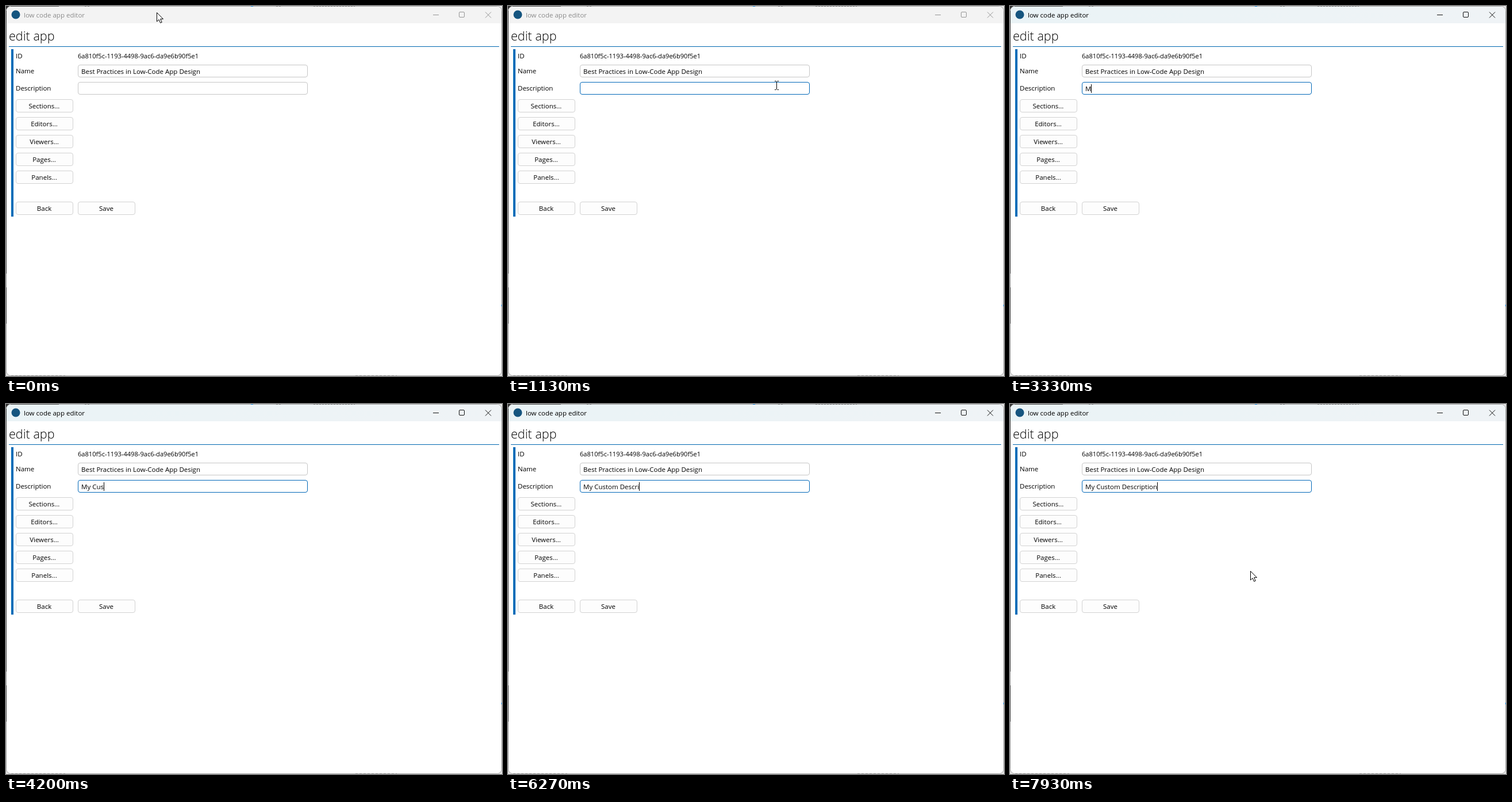
An HTML page for the animation above (8000 ms loop, 863x643 px).

```html
<!DOCTYPE html>
<html lang="en">
<head>
<meta charset="utf-8">
<title>edit app</title>
<style>
html, body { margin: 0; width: 100%; height: 100%; overflow: hidden; background: #e6e6e6; }
svg { display: block; }
text { font: 11.5px "Open Sans", "Noto Sans", sans-serif; white-space: pre; }
.mid { text-anchor: middle; }
.box { fill: #fff; stroke: #c6c6c6; }
.button { fill: #fdfdfd; stroke: #d2d2d2; }
.focus { stroke: #0067b8; }
#bar { fill: #f3f3f3; }
#title { fill: #8c8c8c; }
#controls { fill: none; stroke: #959595; }
.active #bar { fill: url(#mica); }
.active #title { fill: #000; }
.active #controls { stroke: #111; }
</style>
</head>
<body>
<svg id="stage" width="863" height="643" viewBox="0 0 863 643">
  <defs>
    <linearGradient id="mica">
      <stop offset="0" stop-color="#eaf3f6"/>
      <stop offset="1" stop-color="#eff3f6"/>
    </linearGradient>
  </defs>
  <path d="M0 0H92V12H0Z" fill="#333"/>
  <rect x=".5" y=".5" width="862" height="642" rx="8" fill="#fff" stroke="#a2a2a2"/>
  <path id="bar" d="M1 30V9A8 8 0 0 1 9 1H854A8 8 0 0 1 862 9V30Z"/>
  <path d="M.5 8V465M.5 489V552M8 .5H92" stroke="#484848"/>
  <path d="M137 .5H145M470 .5H480M535 .5H607" stroke="#666" stroke-dasharray="3 2"/>
  <path d="M426 .5H430M862.5 519V522" stroke="#0878d0"/>
  <path d="M9 642.5H103M608 642.5H680" stroke="#777" stroke-dasharray="4 3"/>

  <circle cx="17" cy="15" r="7.5" fill="#15557f"/>
  <text id="title" x="31" y="20">low code app editor</text>
  <g id="controls">
    <path d="M743 15.5H753M834 10.5L844 20.5M844 10.5L834 20.5"/>
    <rect x="788.5" y="10.5" width="9" height="9" rx="1.5"/>
  </g>

  <text x="5" y="60" style="font-size:21.6px;font-weight:300">edit app</text>
  <path d="M5 70.5H858" stroke="#0067b0"/>
  <path d="M9 75H13V366H9Z" fill="#006cb8"/>
  <text x="17" y="91">ID</text>
  <text x="125" y="91" style="font-size:11.1px">6a810f5c-1193-4498-9ac6-da9e6b90f5e1</text>
  <text x="17" y="117">Name</text>
  <text x="17" y="147">Description</text>
  <rect class="box" x="125.5" y="102.5" width="399" height="21" rx="3.5"/>
  <text x="131" y="118">Best Practices in Low-Code App Design</text>
  <rect id="field" class="box" x="125.5" y="132.5" width="399" height="21" rx="3.5"/>
  <text id="typed" x="131" y="148"></text>
  <rect id="caret" y="136" width="1" height="15"/>
  <g id="buttons"></g>

  <path id="arrow" d="M.5 .5V16L4.1 12.6L6.6 18.4L9.2 17.3L6.7 11.6H11.5Z" fill="#fff" stroke="#000"/>
  <path id="beam" d="M-3 -7.5H-.5M1.5 -7.5H4M.5 -7V7M-3 7.5H-.5M1.5 7.5H4" fill="none" stroke="#000"/>
</svg>
<script>
const $ = id => document.getElementById(id);
const LOOP = 8000, BLINK = 530;
const FOCUS = 1130, ACTIVE = 2470;
const phrase = "My Custom Description";

// when each letter of the phrase is typed
const keys = [3270, 3600, 3730, 3870, 4070, 4200, 4330, 4470, 4530, 4670, 4870,
  5000, 5270, 5400, 6000, 6270, 6470, 6600, 6670, 6800, 6870];

// pointer: time, shape, x, y
const pointer = [
  [0, "arrow", 262, 11], [70, "arrow", 335, 9], [130, "arrow", 394, 8],
  [270, "arrow", 409, 8], [730, "arrow", 429, 21], [800, "arrow", 440, 48],
  [870, "arrow", 451, 78], [930, "beam", 460, 108], [1000, "beam", 465, 127],
  [1070, "beam", 467, 138], [3330, "none", 0, 0], [7800, "beam", 467, 140],
  [7870, "arrow", 442, 218], [7930, "arrow", 418, 290]
];

function addButton(label, x, y) {
  $("buttons").innerHTML +=
    `<rect class="button" x="${x + .5}" y="${y + .5}" width="99" height="22" rx="3.5"/>
     <text class="mid" x="${x + 49.5}" y="${y + 16}">${label}</text>`;
}
["Sections", "Editors", "Viewers", "Pages", "Panels"]
  .forEach((name, i) => addButton(name + "...", 17, 162 + 31 * i));
addButton("Back", 17, 340);
addButton("Save", 125, 340);

function show(id, on) {
  $(id).style.display = on ? "" : "none";
}

function draw(t) {
  $("stage").classList.toggle("active", t >= ACTIVE);
  $("field").classList.toggle("focus", t >= FOCUS);

  const count = keys.filter(k => k <= t).length;
  const typed = $("typed");
  typed.textContent = phrase.slice(0, count);

  // the caret restarts its blink at each key press
  const since = t - (count ? keys[count - 1] : 2530);
  show("caret", since >= 0 && Math.floor(since / BLINK) % 2 === 0);
  $("caret").setAttribute("x", 131 + (count ? Math.round(typed.getComputedTextLength()) : 0));

  const [, shape, x, y] = pointer.filter(p => p[0] <= t).pop();
  for (const id of ["arrow", "beam"]) {
    show(id, id === shape);
    $(id).setAttribute("transform", `translate(${x} ${y})`);
  }
}

function frame() {
  draw(performance.now() % LOOP);
  requestAnimationFrame(frame);
}
frame();
</script>
</body>
</html>
```
